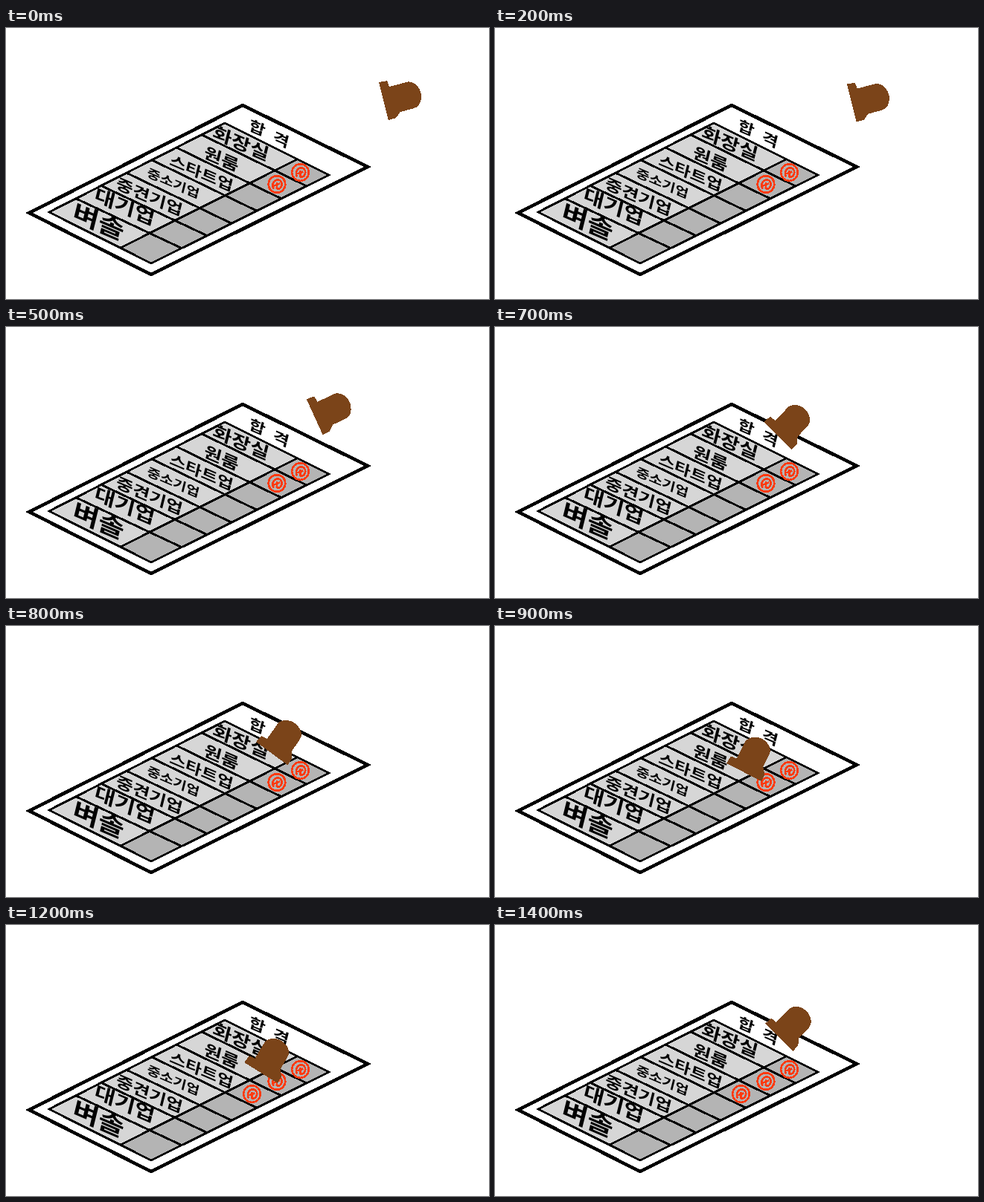
These frames come from a looping animation (649 px wide and 365 px high, 6.4 s). An HTML page:

```html
<!DOCTYPE html>
<html lang="ko">
<head>
<meta charset="utf-8">
<style>
  html, body { margin: 0; width: 100%; height: 100%; overflow: hidden; background: #fff; }
  svg { display: block; width: 100%; height: 100%; }
  text { font-family: "Noto Sans CJK KR", "Noto Sans CJK", sans-serif; font-weight: 700;
         text-anchor: middle; dominant-baseline: central; }
  .ink { fill: none; stroke: #000; stroke-width: 3; }
</style>
</head>
<body>
<svg viewBox="0 0 649 365" shape-rendering="crispEdges">
  <defs>
    <g id="seal" fill="none" stroke="#ff3a10" stroke-width="2.6">
      <circle r="11.3"/>
      <path d="M-4 6C-8 1-4-6 1-6S8-1 6 3S0 7-1 4M-4 2L4-1M0-3V5"/>
    </g>
  </defs>
  <path d="M318 104L486 187L195 332L31 249Z" fill="#fff" stroke="#000" stroke-width="4.6"/>
  <path d="M294 128L391 177L154 296L58 248Z" fill="#d6d6d6"/>
  <path d="M391 177L434 198L195 317L154 296Z" fill="#b4b4b4"/>
  <path class="ink" d="M294 128L434 198L195 317L58 248ZM391 177L154 296"/>
  <path class="ink" id="rows"/>
  <g id="labels"></g>
  <use href="#seal" x="395.5" y="194.5"/>
  <use href="#seal" x="364" y="210.5"/>
  <use href="#seal" x="330.5" y="227.5" id="newSeal"/>
  <path id="stamper" fill="#7b4419"
    d="M-26.3 0L-25.5-11L-17-12L-17.4-38Q-16-44-11-47.5Q-4-52 4-51Q13-49 16-45Q19-42 19.2-37L19.6-18L26-10.5L26.3 0Z"/>
</svg>
<script>
const $ = id => document.getElementById(id);

// Row separators: x on the left and on the right edge of the table
const separators = [[263, 404], [229, 370], [196, 337], [162, 303], [128, 270], [94, 236]];
$("rows").setAttribute("d", separators.map(([l, r]) =>
  `M${l} ${128 + (294 - l) * 120 / 236}L${r} ${198 + (434 - r) * 119 / 239}`).join(""));

// Text, centre, size
const labels = [
  ["합", 338, 133, 23], ["격", 370, 149, 23],
  ["화장실", 316, 154, 27], ["원룸", 290, 175, 25], ["스타트업", 263, 194, 23],
  ["중소기업", 225, 208, 19], ["중견기업", 193, 226, 24],
  ["대기업", 160, 239, 29], ["벼솔", 125, 259, 37]
];
$("labels").innerHTML = labels.map(([text, x, y, size]) =>
  `<text transform="matrix(1 .43 -.2 .8 ${x} ${y})" font-size="${size}">${text}</text>`).join("");

// Stamper poses: step, x and y of the foot's middle, angle
const poses = [
  [4, 432, 108.5, 76], [7, 380, 146.5, 45], [9, 334.5, 197, 27.5],
  [10, 329, 233, 28], [12, 342.5, 199, 32], [14, 381.5, 151.5, 45]
];

function poseAt(step) {
  if (step < 4) {
    const p = step / 4;
    return [507.5 - 75.5 * p ** 1.42, 98.5 + 10 * p ** 2, 76];
  }
  const next = Math.max(1, poses.findIndex(p => p[0] >= step));
  const [from, to] = [poses[next - 1], poses[next]];
  const k = (step - from[0]) / (to[0] - from[0]);
  return [1, 2, 3].map(i => from[i] + (to[i] - from[i]) * k);
}

function draw(now) {
  const step = Math.min(14, Math.floor(now % 6400 / 100));
  const [x, y, angle] = poseAt(step);
  $("stamper").setAttribute("transform", `translate(${x} ${y}) rotate(${angle})`);
  $("newSeal").style.display = step >= 11 ? "" : "none";
  requestAnimationFrame(draw);
}
draw(performance.now());
</script>
</body>
</html>
```
